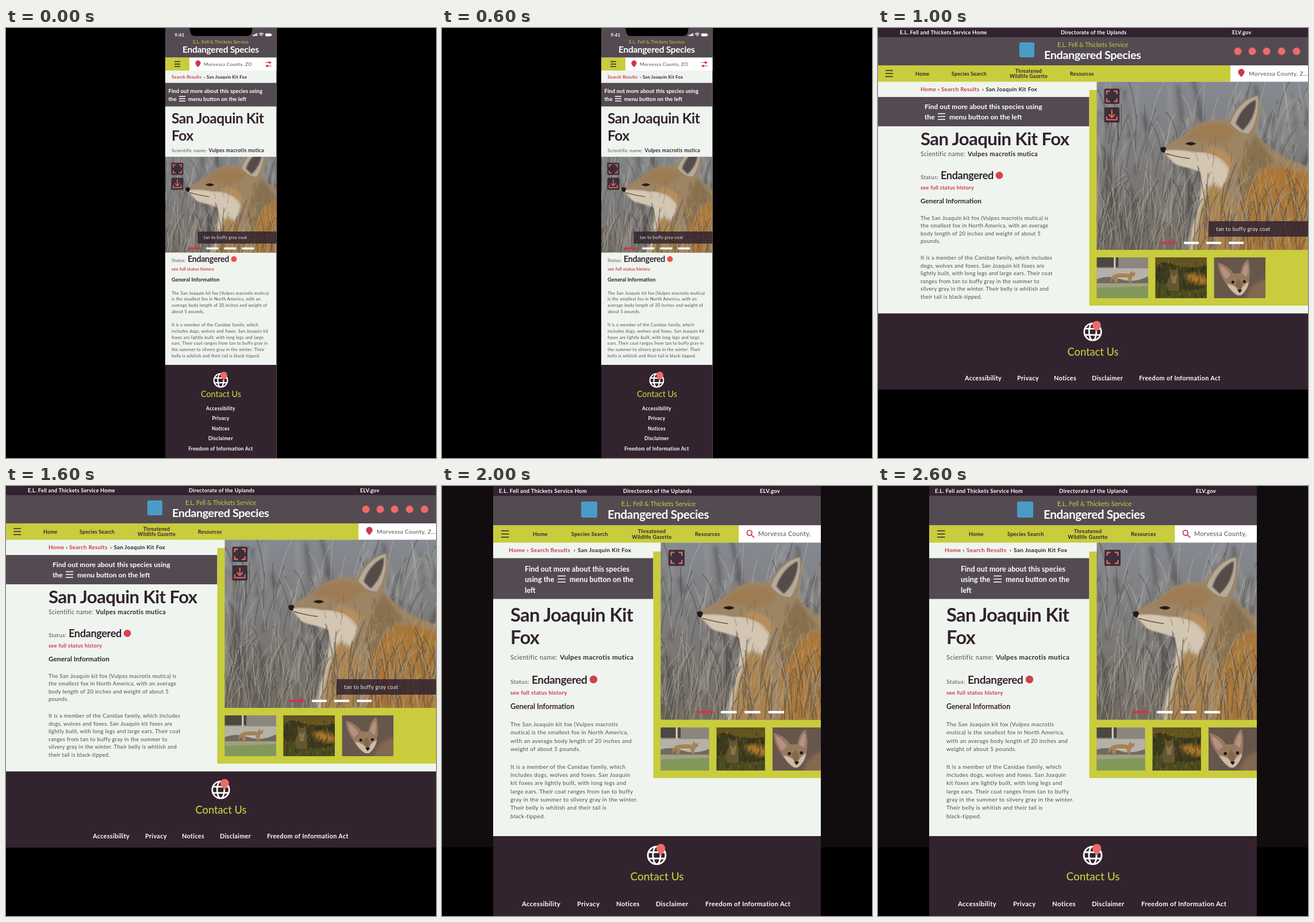
Write an HTML page that moves like this. It is 748x748 px and loops after 3 s.

```html
<!DOCTYPE html>
<html lang="en">
<head>
<meta charset="utf-8">
<title>Endangered Species</title>
<style>
html, body { margin: 0; width: 100%; height: 100%; overflow: hidden; background: #000; }
svg { display: block; }
text { font-family: Lato, "Open Sans", sans-serif; white-space: pre; }
.title { font-weight: 700; letter-spacing: -.02em; }
.medium { font-weight: 500; }
.lead { font-weight: 700; }
.body { letter-spacing: .032em; }
.bold { font-weight: 700; letter-spacing: .03em; }
.mid { text-anchor: middle; }
</style>
</head>
<body>
<svg id="stage" width="748" height="748" viewBox="0 0 748 748"></svg>
<script>
const plum = '#32232f', slate = '#544b52', lime = '#c9cc3c', mint = '#eff5ee',
      red = '#d0344f', coral = '#ee6a66', white = '#fff';

const rect = (x, y, w, h, fill, rx = 0) =>
  `<rect x="${x}" y="${y}" width="${w}" height="${h}" rx="${rx}" fill="${fill}"/>`;
const circle = (x, y, r, fill) => `<circle cx="${x}" cy="${y}" r="${r}" fill="${fill}"/>`;
const shape = (d, fill) => `<path d="${d}" fill="${fill}"/>`;
const line = (d, stroke, width = 1) =>
  `<path d="${d}" fill="none" stroke="${stroke}" stroke-width="${width}"/>`;
const text = (x, y, size, cls, str, fill = plum) =>
  `<text x="${x}" y="${y}" font-size="${size}" class="${cls}" fill="${fill}">${str}</text>`;
const at = (x, y, scale, content) =>
  `<g transform="translate(${x} ${y}) scale(${scale})">${content}</g>`;
const lines = (x, y, step, size, cls, str, fill = slate) =>
  str.split('|').map((s, i) => text(x, y + i * step, size, cls, s, fill)).join('');

// Icons
const burger = (x, y, w, h, color) =>
  line([0, h / 2, h].map(d => `M${x} ${y + d}h${w}`).join(''), color, 1.5);
const pin = (x, y, scale, fill) =>
  at(x, y, scale, shape('M0 6.5C-3 3-5 1-5-1.5A5 5 0 0 1 5-1.5C5 1 3 3 0 6.5Z', fill));
const globe = (x, y, r) => at(x, y, r / 15,
  line('M-14 0A14 14 0 1 0 14 0A14 14 0 1 0-14 0M-6 0A6 14 0 1 0 6 0A6 14 0 1 0-6 0M-13-5H13M-13 5H13', white, 2.6) +
  pin(6.5, -9, 1.4, coral));
const expand = (x, y, size) => at(x, y, size / 27, rect(0, 0, 27, 27, '#32232fe0', 2) +
  line('M4.5 10V4.5H10M17 4.5H22.5V10M22.5 17V22.5H17M10 22.5H4.5V17', coral, 2.2));
const download = (x, y, size) => at(x, y, size / 27, rect(0, 0, 27, 27, '#32232fe0', 2) +
  line('M13.5 4V18M8 12.5L13.5 18L19 12.5M4.5 16V22H22.5V16', coral, 2));
const pager = (x, y, w, h, step) =>
  [0, 1, 2, 3].map(i => rect(x + i * step, y, w, h, i ? white : red)).join('');

const view = (id, x, y, w, h, box) =>
  `<svg x="${x}" y="${y}" width="${w}" height="${h}" viewBox="${box}" preserveAspectRatio="xMidYMid slice"><use href="#${id}"/></svg>`;
const thumbs = (x, y, w, h, step) =>
  [0, 1, 2].map(i => view('thumb' + i, x + i * step, y, w, h, '0 0 90 71')).join('');

// Pictures
let seed = 7;
const random = () => (seed = seed * 16807 % 2147483647) / 2147483647;
const blades = (count, left, top, width, height, length) => {
  let d = '';
  for (let i = 0; i < count; i++) {
    const x = left + random() * width, y = top + random() * height,
          lean = (random() - .4) * length * .7;
    d += `M${x.toFixed(1)} ${y.toFixed(1)}q${(lean * .2).toFixed(1)} ${-length / 2} ${lean.toFixed(1)} ${-(length * (.6 + random() * .5)).toFixed(1)}`;
  }
  return d;
};
const soft = (content, blur) => `<g filter="url(#blur${blur})">${content}</g>`;

const fox =
  rect(370, 83, 388, 313, 'url(#meadow)') +
  soft(line(blades(70, 370, 170, 390, 270, 90), '#4f4c4ca0', 6) +
    line(blades(60, 370, 170, 390, 270, 90), '#a9a7a490', 4), 3) +
  line(blades(90, 370, 150, 390, 270, 80), '#504d4b90', 1.6) +
  line(blades(90, 370, 150, 390, 270, 90), '#bdb8ad90', 1.1) +
  soft(shape('M758 244C715 230 680 215 655 180C664 160 667 132 661 117C640 119 620 138 610 160C590 155 562 160 546 174C536 186 515 195 495 206Q488 212 495 217L514 235C530 243 546 243 560 250C566 275 558 310 548 340L540 396H758Z', '#9c8465') +
    shape('M495 213C512 211 532 212 550 216C580 215 605 225 612 245C600 285 572 320 556 386H540L548 340C558 310 566 275 560 250C546 243 530 243 514 235Z', '#d3c6b2'), 1) +
  soft(shape('M758 258C710 240 680 235 650 252C632 285 622 340 628 396H758Z', '#a87638') +
    shape('M655 186C640 215 630 240 622 270L640 300C650 260 670 245 690 232Z', '#87714f') +
    shape('M546 178C570 164 600 160 622 180C612 200 582 205 566 196Q552 190 526 197Z', '#9d7c53') +
    shape('M575 275C596 270 610 285 618 318L612 396H545C554 340 562 310 575 275Z', '#a98350') +
    shape('M572 208Q600 206 618 228L612 246Q596 220 572 216Z', '#b78f5d'), 3) +
  shape('M613 165C622 140 640 122 660 118C663 138 658 165 645 183Q628 184 613 165Z', '#b5aa9a') +
  soft(shape('M622 166C628 146 643 130 657 124C658 145 648 165 634 178Z', '#544b48'), 1) +
  shape('M491 208Q499 204 501 210L498 217Q490 216 491 208Z', '#1d1a1c') +
  line('M500 218Q520 224 542 227', '#64523f', 1.4) +
  shape('M534 201Q544 195 553 201Q545 207 534 201Z', '#2a1b14') +
  line(blades(110, 610, 230, 140, 160, 18), '#cfa76c80') +
  line(blades(90, 555, 200, 180, 186, 16), '#6a533880') +
  line(blades(110, 370, 320, 390, 100, 85), '#4f4b4a90', 1.8) +
  line(blades(110, 370, 320, 390, 100, 90), '#b0a89890', 1.2);

const standing =
  rect(0, 0, 90, 71, '#8c877c') + rect(0, 0, 38, 17, '#4b4842') + rect(30, 0, 3, 19, '#d2cdbf') +
  rect(0, 19, 90, 27, '#b5b1a8') + shape('M0 38Q20 30 42 38T90 33V46H0Z', '#716a5c') +
  rect(0, 45, 90, 26, '#82985a') + shape('M0 45H90V50L0 53Z', '#a19f84') +
  shape('M25 35L30 30Q45 26 57 29L60 23L63 27L67 25V31L62 34L59 46H57L55 37H38L34 47H32L30 36L24 44Z', '#a5825a') +
  shape('M36 35H55L53 37H38Z', '#d8c29b');
const sitting =
  rect(0, 0, 90, 71, '#3c3a1d') + shape('M0 0H90V14Q55 22 30 12T0 22Z', '#62531f') +
  soft(shape('M50 32Q66 22 90 35V47Q65 50 50 32Z', '#a8752a'), 3) +
  shape('M0 48Q20 40 40 52T90 50V71H0Z', '#4b4c20') +
  line(blades(60, 0, 10, 90, 64, 7), '#a0802f70') + line(blades(60, 0, 14, 90, 60, 8), '#1f201280', 1.5) +
  shape('M24 16L29 22H35L39 16L40 27Q43 42 41 58H23Q18 44 26 31Z', '#645630') +
  shape('M27 28L32 34L38 28L36 45H29Z', '#857349');
const face =
  rect(0, 0, 90, 71, '#66564c') + soft(shape('M56 75Q60 42 95 38V75Z', '#83694f'), 3) +
  shape('M7 9Q26 14 34 28H46Q50 8 60 3Q65 22 61 42Q58 58 47 66H41Q25 56 19 42Q8 28 7 9Z', '#967a60') +
  shape('M11 14Q24 21 29 31L21 38Q12 28 11 14Z', '#b98f84') + shape('M58 9Q61 22 57 34L49 28Q52 15 58 9Z', '#b98f84') +
  shape('M23 46Q36 48 41 55L48 55Q51 47 61 43Q58 58 47 66H41Q30 60 23 46Z', '#cdbba4') +
  shape('M37 46L43 36L49 46L47 57H42Z', '#84674c') +
  circle(33, 43, 2.6, '#211815') + circle(53, 42, 2.6, '#211815') +
  shape('M41 57Q45 54 49 57L45 62Z', '#211815');

const defs = `<defs>
  <linearGradient id="meadow" x2="0" y2="1"><stop stop-color="#868a92"/><stop offset=".55" stop-color="#7b7977"/><stop offset="1" stop-color="#716a5e"/></linearGradient>
  ${[1, 3].map(b => `<filter id="blur${b}"><feGaussianBlur stdDeviation="${b}"/></filter>`).join('')}
  <g id="fox">${fox}</g>
  ${[standing, sitting, face].map((t, i) => `<g id="thumb${i}">${t}</g>`).join('')}
</defs>`;

// Wording
const agency = 'E.L. Fell &amp; Thickets Service', site = 'Endangered Species',
      species = 'San Joaquin Kit Fox', latin = 'Vulpes macrotis mutica',
      links = ['Accessibility', 'Privacy', 'Notices', 'Disclaimer', 'Freedom of Information Act'];
const row = (xs, y, size, words, fill) =>
  words.map((w, i) => text(xs[i], y, size, 'bold', w, fill)).join('');
const nameLine = (x, boldX, y, size) =>
  text(x, y, size * .97, 'body', 'Scientific name:', slate) + text(boldX, y, size * 1.03, 'bold', latin);
const status = (x, wordX, y, small, big, dotX, dotY, r, dot) =>
  text(x, y, small, 'body', 'Status:', slate) + text(wordX, y, big, 'title', 'Endangered') +
  circle(dotX, dotY, r, dot);
const history = (x, y, size) => text(x, y, size, 'bold', 'see full status history', red);
const general = (x, y, size) => text(x, y, size, 'lead', 'General Information');
const contact = (x, y, size) => text(x, y, size, 'medium mid', 'Contact Us', lime);

const phone =
  rect(277, 0, 193.5, 748, mint) + rect(277, 0, 193.5, 51.5, slate) +
  shape('M317 0Q320 0 320 4Q320 14 330 14H418Q428 14 428 4Q428 0 431 0Z', '#000') +
  text(302, 14.5, 8, 'bold mid', '9:41', white) +
  [0, 1, 2, 3].map(i => rect(429 + i * 2.2, 12 - i, 1.6, 2 + i, white)).join('') +
  line('M440 10.5Q444 7.5 448 10.5M441.7 12.4Q444 10.5 446.3 12.4', white, 1.3) + circle(444, 13.6, .8, white) +
  rect(451, 9.5, 10.5, 5, white, 1.4) + rect(462, 11, 1, 2, white) +
  text(373.5, 27, 8.35, 'mid', agency, lime) + text(307, 43, 15.6, 'title', site, white) +
  rect(277, 51.5, 42, 22.5, lime) + rect(319, 51.5, 151.5, 22.5, white) +
  burger(293, 58.5, 10, 8.6, plum) + pin(334, 62.3, .92, red) +
  text(344, 66, 8.3, 'body', 'Morvessa County, ZO', slate) +
  line('M451 60H462M451 66H462', red, 1.2) + circle(458.5, 60, 2, red) + circle(454.5, 66, 2, red) +
  row([288, 344, 349], 87.5, 7.6, [`<tspan fill="${red}">Search Results</tspan>`, '›', species]) +
  rect(277, 95.5, 193.5, 41, slate) +
  text(282.5, 112.5, 9.6, 'lead', 'Find out more about this species using', white) +
  text(282.5, 126.5, 9.6, 'lead', 'the', white) + burger(301, 119, 11, 8, white) +
  text(317, 126.5, 9.6, 'lead', 'menu button on the left', white) +
  lines(288, 166, 30, 24.6, 'title', 'San Joaquin Kit|Fox', plum) +
  nameLine(288, 352.5, 216, 8.55) +
  view('fox', 277, 224, 193.5, 166.5, '447 140 241 208') +
  expand(287.5, 234.5, 21) + download(287.5, 260.5, 21) +
  rect(333.5, 354, 137, 21, '#32232fd8') + text(344, 367, 7.45, 'body', 'tan to buffy gray coat', '#eee') +
  pager(317.5, 381.7, 21, 3.5, 31) +
  status(288, 316, 407, 7.8, 14.2, 396.5, 402, 5, '#f84a4a') +
  history(288, 421.5, 7.35) + general(288, 441, 9.3) +
  lines(288, 463.5, 10.85, 7.5, 'body', 'The San Joaquin kit fox (Vulpes macrotis mutica)|is the smallest fox in North America, with an|average body length of 20 inches and weight of|about 5 pounds.') +
  lines(288, 519, 10.8, 7.5, 'body', 'It is a member of the Canidae family, which|includes dogs, wolves and foxes. San Joaquin kit|foxes are lightly built, with long legs and large|ears. Their coat ranges from tan to buffy gray in|the summer to silvery gray in the winter. Their|belly is whitish and their tail is black-tipped.') +
  rect(277, 586, 193.5, 162, plum) + globe(373.5, 613, 12.6) + contact(374, 641.5, 14.4) +
  links.map((w, i) => text(373.5, 664.5 + i * 17.5, 8.6, 'bold mid', w, white)).join('');

const desktop =
  rect(0, 0, 748, 629, mint) + rect(0, 0, 748, 16, plum) + rect(0, 16, 748, 49.5, slate) +
  row([38, 318, 616], 11, 9.1, ['E.L. Fell and Thickets Service Home', 'Directorate of the Uplands', 'ELV.gov'], white) +
  rect(246, 25, 26, 26, '#4a9cc6', 3) +
  text(373.5, 33, 10.6, 'mid', agency, lime) + text(289, 54, 19.8, 'title', site, white) +
  [626, 651, 676, 702, 728].map(x => circle(x, 40.5, 6.5, coral)).join('') +
  rect(0, 65, 613, 28.5, lime) + rect(613, 65, 135, 28.5, white) + burger(13, 74, 13, 10.4, plum) +
  row([65, 128, 334], 82.5, 8.7, ['Home', 'Species Search', 'Resources']) +
  lines(262, 77.5, 9.8, 8.6, 'bold mid', 'Threatened|Wildlife Gazette', plum) +
  pin(632, 78.3, 1.12, red) + text(645, 83, 10.2, 'body', 'Morvessa County, Z...', slate) +
  row([74, 104, 110, 181, 187.5], 109.5, 9.7,
    [`<tspan fill="${red}">Home</tspan>`, '›', `<tspan fill="${red}">Search Results</tspan>`, '›', species]) +
  rect(0, 120, 367.5, 51, slate) +
  text(81, 141, 12, 'lead', 'Find out more about this species using', white) +
  text(81, 158.5, 12, 'lead', 'the', white) + burger(104, 149, 13, 10, white) +
  text(124, 158.5, 12, 'lead', 'menu button on the left', white) +
  text(74, 203.5, 31.2, 'title', species) + nameLine(74, 156, 223, 10.8) +
  status(74, 109, 263, 9.8, 18.1, 211, 256.3, 6.4, '#d9434f') +
  history(74, 281, 9.2) + general(74, 305, 11.8) +
  lines(74, 333.5, 13.6, 9.45, 'body', 'The San Joaquin kit fox (Vulpes macrotis mutica) is|the smallest fox in North America, with an average|body length of 20 inches and weight of about 5|pounds.') +
  lines(74, 403, 13.6, 9.45, 'body', 'It is a member of the Canidae family, which includes|dogs, wolves and foxes. San Joaquin kit foxes are|lightly built, with long legs and large ears. Their coat|ranges from tan to buffy gray in the summer to|silvery gray in the winter. Their belly is whitish and|their tail is black-tipped.') +
  rect(367.5, 108, 380.5, 375, lime) + view('fox', 380.5, 93.5, 367.5, 292.5, '380 93 368 293') +
  expand(393.5, 105.5, 26.5) + download(393.5, 138, 26.5) +
  rect(575, 336, 173, 27, '#32232fd8') + text(588, 353, 9.35, 'body', 'tan to buffy gray coat', '#eee') +
  pager(493, 371.8, 26, 4, 39) + thumbs(380.5, 399, 89.5, 71, 102) +
  rect(0, 496.5, 748, 132.5, plum) + globe(373.5, 528.5, 15.8) + contact(374, 570, 18.2) +
  row([151, 242, 306, 372, 454], 612.5, 10.85, links, white);

const tablet =
  rect(0, 0, 748, 628.5, '#110d0f') + rect(89, 0, 570, 748, mint) +
  rect(89, 0, 570, 17, plum) + rect(89, 17, 570, 51.5, slate) +
  row([99, 315, 553], 11.5, 9.5, ['E.L. Fell and Thickets Service Hom', 'Directorate of the Uplands', 'ELV.gov'], white) +
  rect(242, 27, 28, 28, '#4a9cc6', 3) +
  text(376.5, 35, 11.1, 'mid', agency, lime) + text(288, 56.5, 20.7, 'title', site, white) +
  rect(89, 68.5, 427.5, 30, lime) + rect(516.5, 68.5, 142.5, 30, white) + burger(103, 78, 13.5, 11, plum) +
  row([158, 225, 440], 87, 9.1, ['Home', 'Species Search', 'Resources']) +
  lines(365, 81.5, 10.2, 9, 'bold mid', 'Threatened|Wildlife Gazette', plum) +
  line('M530.5 81.5a4.3 4.3 0 1 0 8.6 0a4.3 4.3 0 1 0-8.6 0M538 84.8L543 89.8', red, 1.8) +
  text(550, 87, 10.9, 'body', 'Morvessa County,', slate) +
  row([116, 147.5, 154, 229, 236], 115, 10.1,
    [`<tspan fill="${red}">Home</tspan>`, '›', `<tspan fill="${red}">Search Results</tspan>`, '›', species]) +
  rect(89, 125.5, 278.5, 71, slate) +
  text(144, 148.5, 12.6, 'lead', 'Find out more about this species', white) +
  text(144, 167, 12.6, 'lead', 'using the', white) + burger(201, 156.5, 14, 10.6, white) +
  text(222, 167, 12.6, 'lead', 'menu button on the', white) + text(144, 185.5, 12.6, 'lead', 'left', white) +
  lines(119, 235.5, 39.5, 32.7, 'title', 'San Joaquin Kit|Fox', plum) + nameLine(119, 205, 302, 11.35) +
  status(119, 156, 343.5, 10.3, 19, 263.5, 336.5, 6.7, '#d0414b') +
  history(119, 362.5, 9.75) + general(119, 388, 12.4) +
  lines(119, 418, 14.45, 9.95, 'body', 'The San Joaquin kit fox (Vulpes macrotis|mutica) is the smallest fox in North America,|with an average body length of 20 inches and|weight of about 5 pounds.') +
  lines(119, 491.5, 14.35, 9.95, 'body', 'It is a member of the Canidae family, which|includes dogs, wolves and foxes. San Joaquin|kit foxes are lightly built, with long legs and|large ears. Their coat ranges from tan to buffy|gray in the summer to silvery gray in the winter.|Their belly is whitish and their tail is|black-tipped.') +
  rect(367.5, 114, 291.5, 394, lime) + view('fox', 380.5, 98.5, 278.5, 308, '431 93.4 264.5 292') +
  expand(394, 111, 28) + pager(444, 391.3, 27.5, 4.2, 41.2) + thumbs(380.5, 420, 84, 75, 97.2) +
  rect(89, 609, 570, 139, plum) + globe(373.5, 642.5, 16.5) + contact(374, 686, 19.1) +
  row([139, 235, 303, 372, 458], 730.5, 11.35, links, white);

const stage = document.getElementById('stage');
stage.innerHTML = defs + [phone, desktop, tablet].map(s => `<g class="scene">${s}</g>`).join('');
const scenes = [...stage.querySelectorAll('.scene')];

function draw() {
  const current = Math.floor(performance.now() / 1000) % scenes.length;
  scenes.forEach((scene, i) => scene.style.display = i === current ? '' : 'none');
  requestAnimationFrame(draw);
}
draw();
</script>
</body>
</html>
```
